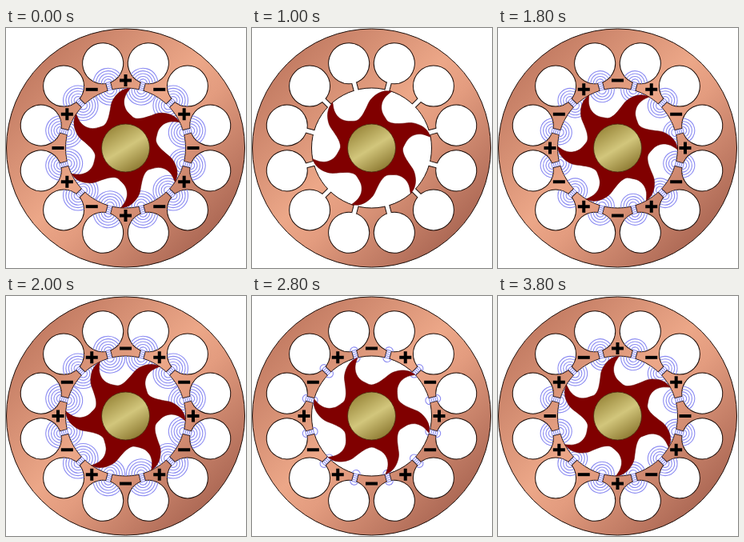
These frames come from a looping animation (300 by 300 pixels, 4 s). An HTML page:

```html
<!DOCTYPE html>
<html lang="en">
<head>
<meta charset="utf-8">
<title>Cavity magnetron</title>
<style>
html, body { margin: 0; width: 100%; height: 100%; overflow: hidden; background: #fff; }
svg { display: block; width: 300px; height: 300px; }
.edge { fill: none; stroke: #1c0e0a; stroke-width: 1; }
.field { fill: none; stroke: #8c8cf2; stroke-width: 1.1; }
</style>
</head>
<body>
<svg viewBox="0 0 300 300">
  <defs>
    <linearGradient id="copper" gradientUnits="userSpaceOnUse" x1="45" y1="45" x2="255" y2="255">
      <stop offset="0" stop-color="#c47d64"/>
      <stop offset=".45" stop-color="#eca788"/>
      <stop offset=".6" stop-color="#e39c7f"/>
      <stop offset="1" stop-color="#ae6a56"/>
    </linearGradient>
    <linearGradient id="gold" gradientUnits="userSpaceOnUse" x1="134" y1="124" x2="166" y2="176">
      <stop offset="0" stop-color="#9c8a3e"/>
      <stop offset=".5" stop-color="#d2c67c"/>
      <stop offset="1" stop-color="#8f7c34"/>
    </linearGradient>
    <clipPath id="inCavity"><circle cy="-109.5" r="25.5"/></clipPath>
    <clipPath id="inCore"><circle r="75"/></clipPath>
  </defs>
  <g id="stage" transform="translate(149.5 150)">
    <circle r="149" fill="url(#copper)" transform="translate(0 0)" class="body"/>
  </g>
</svg>
<script>
const NS = "http://www.w3.org/2000/svg";
const LOOP = 4000, STEP = 200, LEVELS = 5;
const CORE = 75, CAVITY = 25.5, CAVITY_AT = 109.5, SLOT_TOP = 84, SLOT_HALF = 3, SIGN_AT = 84.5;
const stage = document.getElementById("stage");

function add(parent, tag, attrs = {}) {
  const node = document.createElementNS(NS, tag);
  for (const key in attrs) node.setAttribute(key, attrs[key]);
  return parent.appendChild(node);
}

function polar(r, deg) {
  const a = deg * Math.PI / 180;
  return [r * Math.sin(a), -r * Math.cos(a)];
}

// Gradients are set in stage pixels, so shift them to the centred group.
for (const id of ["copper", "gold"])
  document.getElementById(id).setAttribute("gradientTransform", "translate(-150 -150)");
stage.querySelector(".body").setAttribute("stroke", "#1c0e0a");

add(stage, "circle", { r: CORE, fill: "#fff" });
add(stage, "circle", { r: CORE, class: "edge" });

// One group of field lines per strength, shared by all twelve gaps.
const fieldLayers = Array.from({ length: LEVELS }, () => []);

for (let i = 0; i < 12; i++) {
  const gap = add(stage, "g", { transform: `rotate(${15 + 30 * i})` });
  add(gap, "circle", { cy: -CAVITY_AT, r: CAVITY, fill: "#fff", class: "hole" });
  add(gap, "circle", { cy: -CAVITY_AT, r: CAVITY, class: "edge" });
  add(gap, "rect", { x: -SLOT_HALF, y: -SLOT_TOP - 1, width: 2 * SLOT_HALF, height: 12, fill: "#fff" });
  add(gap, "path", { class: "edge", d: `M${-SLOT_HALF} -74.5V-84.5M${SLOT_HALF} -74.5V-84.5` });

  for (let n = 0; n < LEVELS; n++) {
    const r = 5 + 3.4 * n;
    const layer = add(gap, "g", { class: "field" });
    if (n === 0) {
      let d = "";
      for (let y = 75; y <= 85; y += 2.5) d += `M${-SLOT_HALF} ${-y}H${SLOT_HALF}`;
      add(layer, "path", { d });
    }
    const outer = add(layer, "g", { "clip-path": "url(#inCavity)" });
    add(outer, "circle", { cy: -SLOT_TOP, r });
    const inner = add(layer, "g", { "clip-path": "url(#inCore)" });
    add(inner, "circle", { cy: -CORE, r });
    fieldLayers[n].push(layer);
  }
}

// Two sets of charges: plus signs on even vanes, or on odd vanes.
const signs = [0, 1].map(parity => {
  const group = add(stage, "g", { stroke: "#000", "stroke-width": 4 });
  for (let i = 0; i < 12; i++) {
    const [x, y] = polar(SIGN_AT, 30 * i);
    const bar = `M${x - 7.5} ${y}h15`;
    const post = i % 2 === parity ? `M${x} ${y - 7.5}v15` : "";
    add(group, "path", { d: bar + post });
  }
  return group;
});

// Bay between two arms, from tip to tip: radius and angle.
const bay = [
  [75, -13.5], [66, -18], [57, -20], [48, -17.5], [41.5, -9], [39, 0],
  [42.5, 11], [50, 19], [60, 25.5], [68, 33], [73, 40], [75, 46.5]
];

function curve(points) {
  let d = "";
  for (let i = 0; i < points.length - 1; i++) {
    const p0 = points[Math.max(i - 1, 0)], p1 = points[i], p2 = points[i + 1];
    const p3 = points[Math.min(i + 2, points.length - 1)];
    const a = p1.map((v, k) => v + (p2[k] - p0[k]) / 6);
    const b = p2.map((v, k) => v - (p3[k] - p1[k]) / 6);
    d += "C" + [...a, ...b, ...p2].map(v => v.toFixed(2)).join(" ");
  }
  return d;
}

let outline = "M" + polar(...bay[0]).join(" ");
for (let arm = 0; arm < 6; arm++)
  outline += curve(bay.map(([r, deg]) => polar(r, deg + 60 * arm)));
const rotor = add(stage, "path", { d: outline + "Z", fill: "#800000", stroke: "#600000", "stroke-width": 0.5 });
add(stage, "circle", { r: 30, fill: "url(#gold)", stroke: "#4a2a10", "stroke-width": 0.8 });

function show(node, on) {
  node.style.display = on ? "" : "none";
}

let last = -1;
function draw(now) {
  const step = Math.floor((now % LOOP) / STEP);
  if (step !== last) {
    last = step;
    const level = Math.abs(LEVELS - step % 10);
    fieldLayers.forEach((layer, n) => layer.forEach(node => show(node, n < level)));
    show(signs[0], step < 5 || step > 15);
    show(signs[1], step > 5 && step < 15);
    rotor.setAttribute("transform", `rotate(${18 + 3 * step})`);
  }
  requestAnimationFrame(draw);
}
const start = performance.now();
draw(0);
requestAnimationFrame(function tick() {
  draw = now => {};
  const loop = () => { render(performance.now() - start); requestAnimationFrame(loop); };
  loop();
});

function render(time) {
  const step = Math.floor((time % LOOP) / STEP);
  if (step === last) return;
  last = step;
  const level = Math.abs(LEVELS - step % 10);
  fieldLayers.forEach((layer, n) => layer.forEach(node => show(node, n < level)));
  show(signs[0], step < 5 || step > 15);
  show(signs[1], step > 5 && step < 15);
  rotor.setAttribute("transform", `rotate(${18 + 3 * step})`);
}
</script>
</body>
</html>
```
